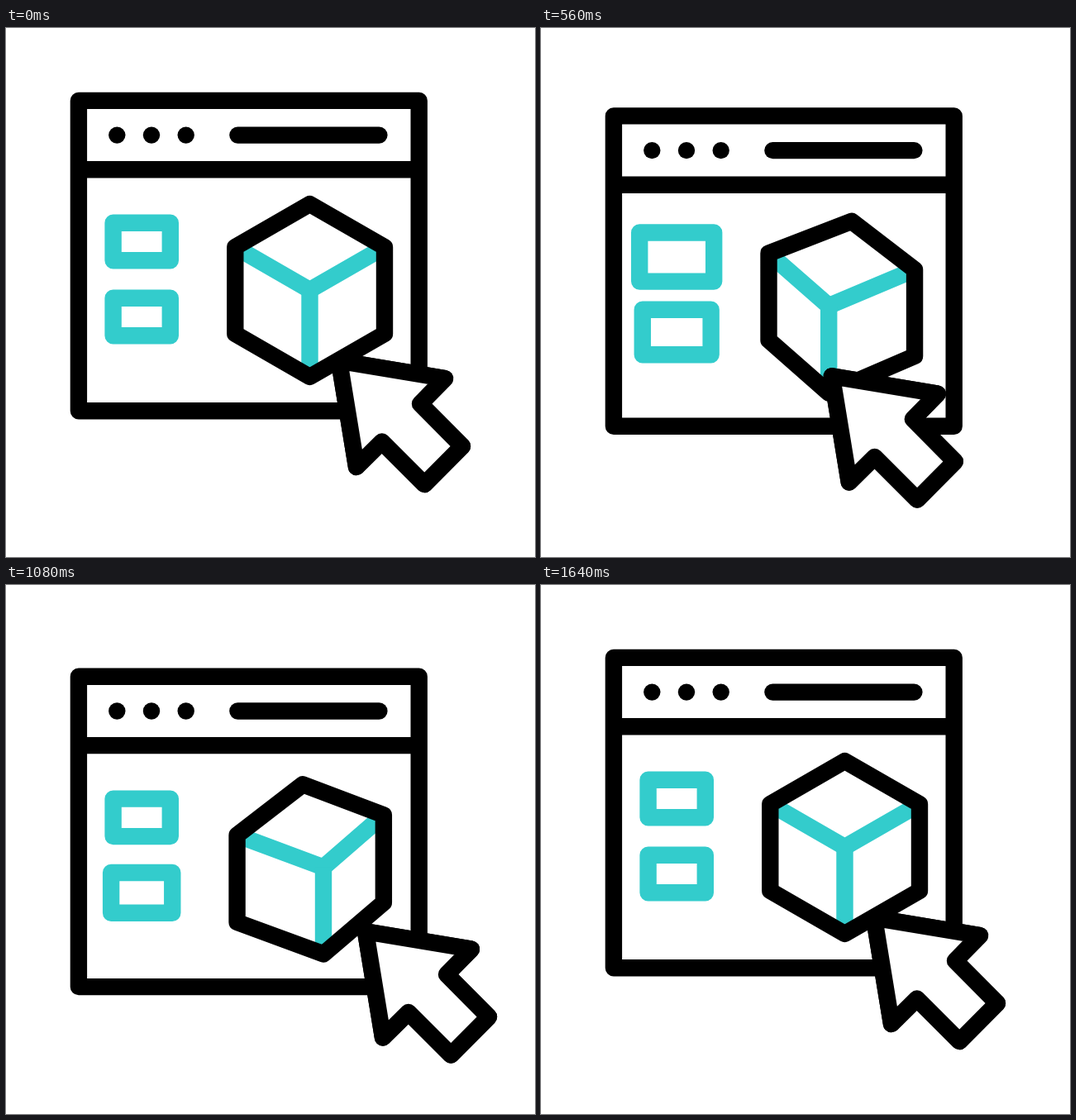
Recreate the animation shown at these times as an HTML page with a canvas. Size 640 by 640 pixels, loop 2000 ms.

```html
<!DOCTYPE html>
<html lang="en">
<head>
<meta charset="utf-8">
<title>Browser window with rotating cube</title>
<style>
  html, body { margin: 0; width: 100%; height: 100%; overflow: hidden; background: #fff; }
  canvas { display: block; width: 100vmin; height: 100vmin; }
</style>
</head>
<body>
<canvas width="640" height="640"></canvas>
<script>
const ctx = document.querySelector('canvas').getContext('2d');
const LOOP = 2000, MOTION_END = 1640, STEP = 40;
const BLACK = '#000', TEAL = '#33cccc', LINE = 20.4;

// Symmetric ease in and out: cubic-bezier(.5, 0, .5, 1)
function ease(x) {
  let s = x;
  for (let i = 0; i < 6; i++) {
    s -= (1.5 * s * (1 - s) + s ** 3 - x) / (1.5 - 3 * s + 3 * s * s);
  }
  return s * s * (3 - 2 * s);
}

// Eased value of a list of [time, value] keys
function track(t, keys) {
  if (t <= keys[0][0]) return keys[0][1];
  for (let i = 1; i < keys.length; i++) {
    const [t0, v0] = keys[i - 1], [t1, v1] = keys[i];
    if (t <= t1) return v0 + (v1 - v0) * ease((t - t0) / (t1 - t0));
  }
  return keys[keys.length - 1][1];
}

const lift = [[50, 0], [874, 25.6], [895, 25.6], [1630, 0]];
const turn = [[20, 0], [470, -1.045], [484, -1.045], [1069, 1.138], [1147, 1.138], [1500, 0]];
const pointerX = [[20, 0], [490, -51.2], [561, -51.2], [1052, 32], [1100, 32], [1500, 0]];
const pointerY = [[561, 0], [1052, -6.3], [1100, -6.3], [1500, 0]];
const pulse = mid => [[mid - 490, 1], [mid, 1.3], [mid + 490, 1]];
const pulseTop = pulse(560), pulseBottom = pulse(765);

// Each corner: resting point, shift when turned left, shift when turned right
const cube = {
  top:        [[367.5, 213], [8.5, 2.3], [-7.5, 4.8]],
  upperRight: [[458, 265], [-6, 9], [-1, -8.5]],
  lowerRight: [[458, 370], [-6, 8.5], [-1, -7.5]],
  bottom:     [[367.5, 422], [-19.5, 1], [14.5, 1.4]],
  lowerLeft:  [[277.3, 370], [-1.8, -11], [2, 13.3]],
  upperLeft:  [[277.3, 265], [-1.8, -11], [2, 13]],
  front:      [[367.5, 317], [-19.5, 0.7], [14.5, 1.4]]
};

const pointer = [[403, 402.7], [531, 424], [501, 454.6], [552, 506],
                 [506.3, 552], [454.8, 500.5], [424, 531]];

function path(points, color, closed) {
  ctx.beginPath();
  points.forEach(p => ctx.lineTo(...p));
  if (closed) ctx.closePath();
  ctx.strokeStyle = color;
  ctx.stroke();
}

function box(cx, cy, w, h, color) {
  ctx.strokeStyle = color;
  ctx.strokeRect(cx - w / 2, cy - h / 2, w, h);
}

function drawWindow() {
  box(293.8, 275.6, 411.8, 375.4, BLACK);
  path([[88, 171.3], [499.7, 171.3]], BLACK);
  ctx.fillStyle = BLACK;
  for (const x of [134.3, 176, 217.7]) {
    ctx.beginPath();
    ctx.arc(x, 129.6, LINE / 2, 0, 2 * Math.PI);
    ctx.fill();
  }
  ctx.lineCap = 'round';
  path([[280.4, 129.6], [451.4, 129.6]], BLACK);
  ctx.lineCap = 'butt';
}

function drawTile(cy, scale) {
  box(164.2, cy, 69.2 * scale, 45.5 * scale, TEAL);
}

function drawCube(amount) {
  const p = {};
  for (const name in cube) {
    const [rest, left, right] = cube[name];
    const shift = amount < 0 ? left : right;
    p[name] = rest.map((v, i) => v + shift[i] * Math.abs(amount));
  }
  path([p.upperLeft, p.front, p.upperRight], TEAL);
  path([p.front, p.bottom], TEAL);
  path([p.top, p.upperRight, p.lowerRight, p.bottom, p.lowerLeft, p.upperLeft], BLACK, true);
}

function drawPointer(dx, dy) {
  ctx.save();
  ctx.translate(dx, dy);
  path(pointer, BLACK, true);
  ctx.fillStyle = '#fff';
  ctx.fill();
  path(pointer, BLACK, true);
  ctx.restore();
}

function draw(t) {
  ctx.fillStyle = '#fff';
  ctx.fillRect(0, 0, 640, 640);
  ctx.lineWidth = LINE;
  ctx.lineJoin = 'round';
  ctx.save();
  ctx.translate(0, track(t, lift));
  drawWindow();
  drawTile(258.5, track(t, pulseTop));
  drawTile(349.5, track(t, pulseBottom));
  drawCube(track(t, turn));
  drawPointer(track(t, pointerX), track(t, pointerY));
  ctx.restore();
}

function frame() {
  const t = performance.now() % LOOP;
  draw(Math.min(MOTION_END, Math.floor(t / STEP) * STEP));
  requestAnimationFrame(frame);
}
frame();
</script>
</body>
</html>
```
